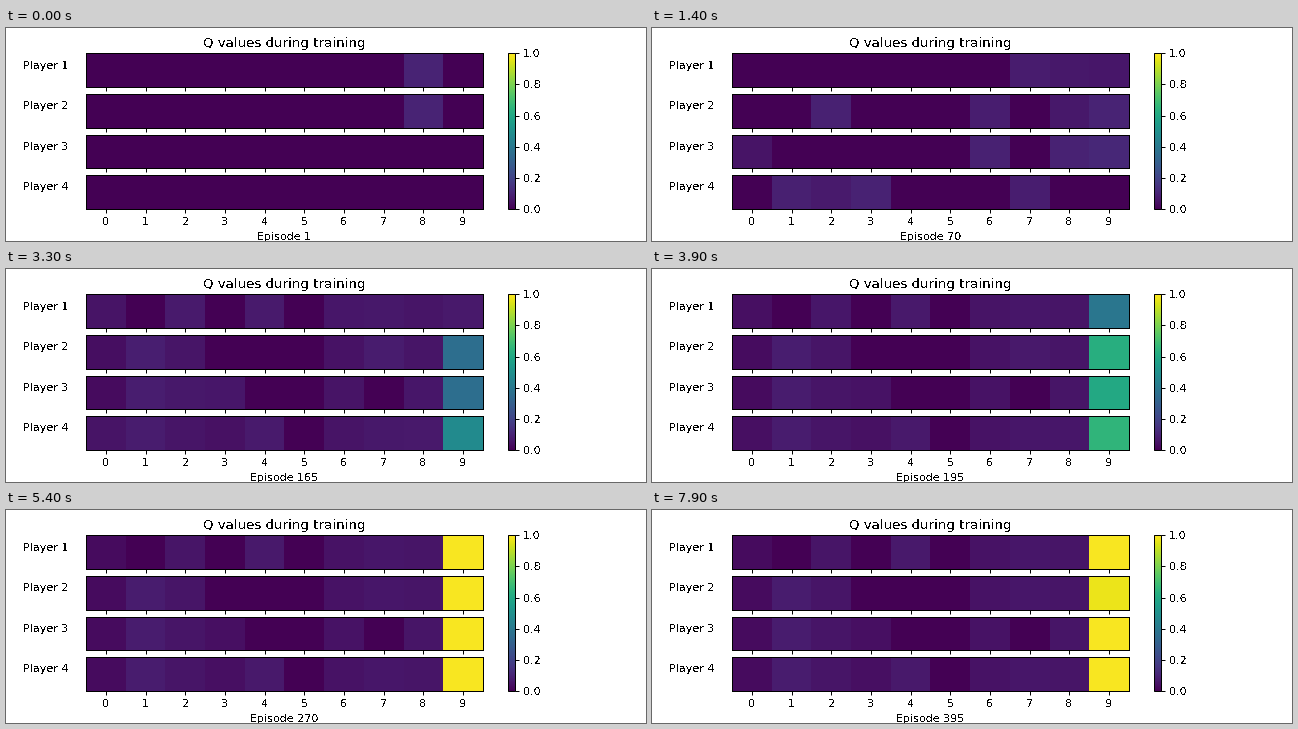
Recreate the animation shown at these times as a matplotlib script. Size 640x213 px, loop 8000 ms.

```python
import numpy as np
import matplotlib.pyplot as plt
from matplotlib.animation import FuncAnimation

FRAMES, INTERVAL, DPI = 80, 100, 80
WIDTH, HEIGHT = 640, 213
PLAYERS, ACTIONS, RATE = 4, 10, 0.1

# Losing actions: never tried by a player, or briefly overrated.
UNTRIED = [(1, 3, 5), (3, 4, 5), (4, 5, 7), (5,)]
OVERRATED = [(2, 6, 8), (8,), (2,), (6, 8)]

# Key points of the winning action, one curve per player.
WIN_TIMES = [0, 14, 23, 33, 44, 52]
WIN_VALUES = [
    [0, 0.06, 0.04, 0.07, 0.66, 0.99],
    [0, 0.10, 0.25, 0.36, 0.85, 0.99],
    [0, 0.11, 0.19, 0.36, 0.81, 0.99],
    [0, 0.00, 0.08, 0.48, 0.80, 0.99],
]
SLIP_TIME, SLIP_PLAYER, SLIP_VALUE = 73, 1, 0.97


def mask(choices):
    return np.array([np.isin(np.arange(ACTIONS - 1), c) for c in choices])


untried, overrated = mask(UNTRIED), mask(OVERRATED)
action = np.arange(ACTIONS - 1)
resting = 0.055 + 0.03 * np.exp(-action / 5) * np.sin(np.pi * (2 * action - 1) / 3)
rng = np.random.default_rng(4)
first_try = rng.uniform(1, 25, untried.shape)
first_try[:2, 8] = 0


def q_values(frame):
    # The first try jumps to the learning rate, then the value decays to rest.
    age = np.maximum(frame - first_try, 0)
    losing = resting + (RATE - resting) * np.exp(-age / 8)
    losing += 0.08 * overrated * np.exp(-((frame - 23) / 5) ** 2)
    losing[untried | (frame < first_try)] = 0
    winning = np.array([np.interp(frame, WIN_TIMES, v) for v in WIN_VALUES])
    if frame >= SLIP_TIME:
        winning[SLIP_PLAYER] = SLIP_VALUE
    return np.column_stack([losing, winning])


plt.rcParams.update({
    "font.family": "DejaVu Sans",
    "text.antialiased": False,
    "axes.linewidth": 0.9,
    "axes.titlepad": 5.7,
    "xtick.major.width": 0.9,
    "ytick.major.width": 0.9,
    "xtick.major.pad": 3.8,
})
fig, axes = plt.subplots(PLAYERS, 1, sharex=True, dpi=DPI,
                         figsize=(WIDTH / DPI, HEIGHT / DPI))
fig.subplots_adjust(top=187.73 / HEIGHT, bottom=32 / HEIGHT)

images = []
for i, ax in enumerate(axes):
    images.append(ax.imshow(np.zeros((1, ACTIONS)), cmap="viridis",
                            vmin=0, vmax=1, aspect="auto"))
    ax.set_xticks(range(ACTIONS))
    ax.set_yticks([])
    ax.set_ylabel(f"Player {i + 1}", rotation=0)
    ax.yaxis.set_label_coords(-0.1009, 0.49)
axes[0].set_title("Q values during training")
fig.colorbar(images[0], ax=list(axes), ticks=np.linspace(0, 1, 6))


def update(frame):
    for image, row in zip(images, q_values(frame)):
        image.set_data(row[None])
    axes[-1].set_xlabel(f"Episode {max(1, 5 * frame)}")
    return images


anim = FuncAnimation(fig, update, frames=FRAMES, interval=INTERVAL,
                     init_func=lambda: update(0), repeat=True, repeat_delay=0)
plt.show()
```
